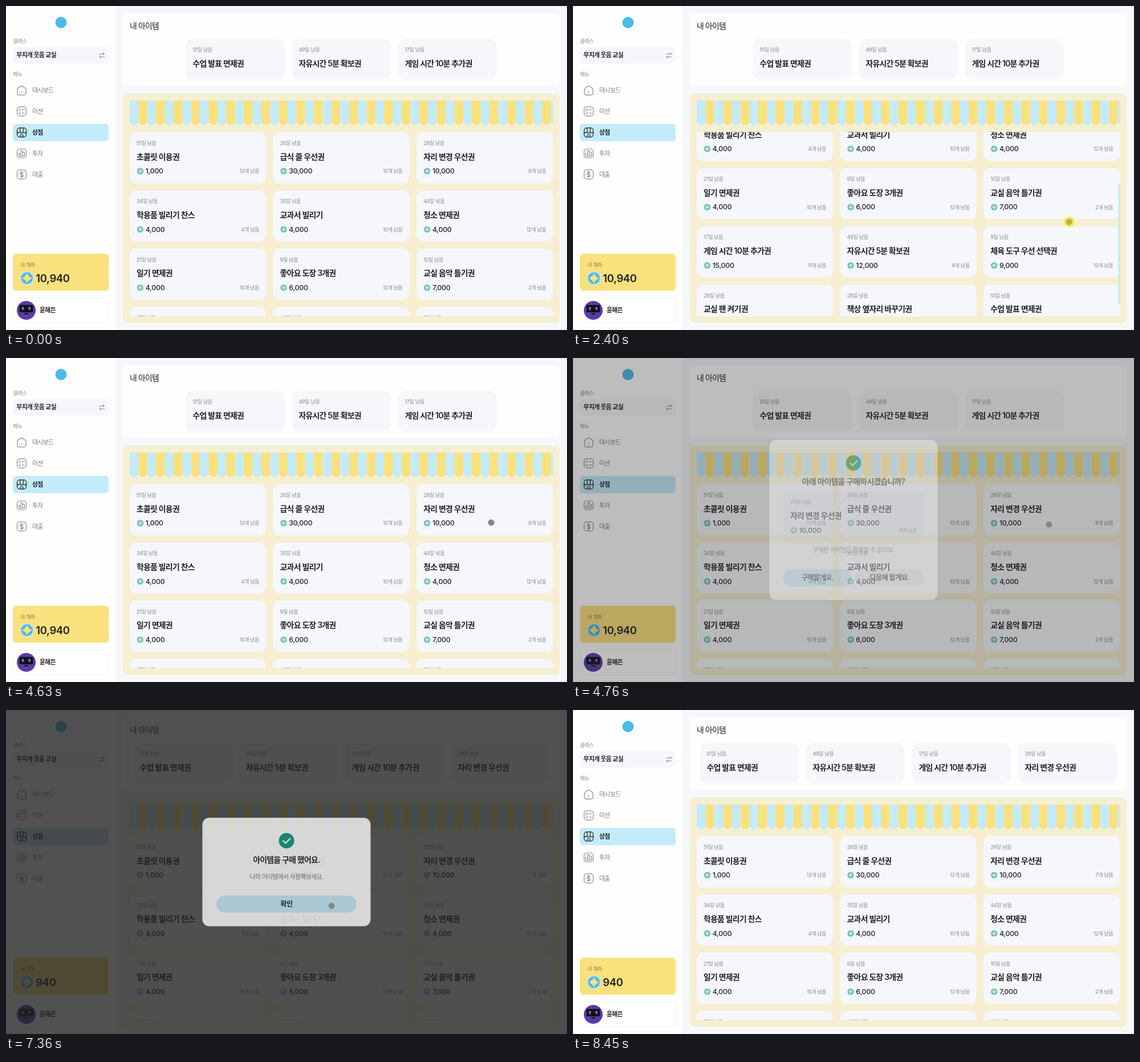
An HTML page for the animation above (8.83 s loop, 984 by 569 pixels).

```html
<!DOCTYPE html>
<html lang="ko">
<head>
<meta charset="utf-8">
<title>상점</title>
<style>
html, body { margin: 0; width: 100%; height: 100%; overflow: hidden; background: #f6f7fb; }
svg { display: block; width: 100%; height: 100%; }
text { font-family: Inter, "Noto Sans CJK KR", "Noto Sans CJK", sans-serif; letter-spacing: -.054em; white-space: pre; }
text.num { letter-spacing: -.02em; }
.icon { fill: none; stroke-width: 1.2; stroke-linecap: round; stroke-linejoin: round; }
</style>
</head>
<body>
<svg id="stage" viewBox="0 0 984 569" xmlns="http://www.w3.org/2000/svg"></svg>
<script>
const LOOP = 8830, BOUGHT_AT = 5910;
const BLUE = '#c3ebfa', YELLOW = '#fae17d', PALE = '#f6f7fb', INK = '#202124', GREY = '#8a8b8e';

const rect = (x, y, w, h, r, fill, extra = '') =>
  `<rect x="${x}" y="${y}" width="${w}" height="${h}" rx="${r}" fill="${fill}" ${extra}/>`;
const circle = (x, y, r, fill) => `<circle cx="${x}" cy="${y}" r="${r}" fill="${fill}"/>`;
const group = (id, body) => `<g id="${id}">${body}</g>`;

// y is the vertical middle of the line
const text = (x, y, str, size, weight = 400, fill = INK, extra = '') =>
  `<text x="${x}" y="${y + size * .37}" font-size="${size}" font-weight="${weight}" fill="${fill}" ${extra}>${str}</text>`;
const small = (x, y, str, extra) => text(x, y, str, 9.24, 400, GREY, extra);
const label = (x, y, str) => text(x, y, str, 9.24, 500, GREY);
const title = (x, y, str, extra) => text(x, y, str, 13.9, 600, INK, extra);
const MIDDLE = 'text-anchor="middle"', END = 'text-anchor="end"', NUM = 'class="num"';

const coin = (x, y, r) => `<g transform="translate(${x} ${y}) scale(${r / 12})">
  ${circle(0, 0, 12, '#b9e5f6')}${circle(0, 0, 10, '#4db8e5')}
  <path d="M0-7.5Q2.5-2.5 7.5 0Q2.5 2.5 0 7.5Q-2.5 2.5-7.5 0Q-2.5-2.5 0-7.5Z" fill="${YELLOW}" stroke="${YELLOW}" stroke-linejoin="round"/></g>`;

// days left | name | price | stock
const goods = `51|초콜릿 이용권|1,000|13
26|급식 줄 우선권|30,000|12
29|자리 변경 우선권|10,000|8
34|학용품 빌리기 찬스|4,000|4
35|교과서 빌리기|4,000|10
44|청소 면제권|4,000|12
21|일기 면제권|4,000|15
9|좋아요 도장 3개권|6,000|12
10|교실 음악 틀기권|7,000|2
17|게임 시간 10분 추가권|15,000|11
49|자유시간 5분 확보권|12,000|9
9|체육 도구 우선 선택권|9,000|13
28|교실 팬 켜기권|5,000|10
28|책상 옆자리 바꾸기권|8,000|7
51|수업 발표 면제권|5,000|12`.split('\n').map(line => line.split('|'));
const chosen = goods[2];
const mine = ['수업 발표', '자유시간', '게임 시간'].map(word => goods.findLast(g => g[1].startsWith(word)));

const card = (x, y, w, [days, name, price, stock], attrs = '') =>
  rect(x, y, w, 89.7, 12, PALE)
  + small(x + 12, y + 19, `${days}일 남음`)
  + title(x + 12, y + 43, name)
  + coin(x + 18.4, y + 68.5, 6.2)
  + text(x + 27.7, y + 68.2, price, 12.3, 500, INK, NUM)
  + small(x + w - 12, y + 68.5, `${stock}개 남음`, `${END} ${attrs}`);

// owned items are centred in the upper panel
const owned = list => list.map(([days, name], i) => {
  const x = 588.2 + (i - list.length / 2) * 186 + 6.2;
  return rect(x, 58, 173.5, 71, 12, PALE) + small(x + 12, 77, `${days}일 남음`) + title(x + 12, 100.5, name);
}).join('');

const frame = '<rect x="-8" y="-8" width="16" height="16" rx="4.5"/>';
const menu = [
  ['대시보드', '<path d="M-7.5-1.5Q-7.5-3-6.3-4L-1.8-7.3Q0-8.5 1.8-7.3L6.3-4Q7.5-3 7.5-1.5V4.5Q7.5 8 4 8H-4Q-7.5 8-7.5 4.5ZM0 2V4.5"/>'],
  ['미션', frame + '<path d="M-5-3l1.2 1.2l2-2.4M1-3h4M-5 3l1.2 1.2l2-2.4M1 3h4"/>'],
  ['상점', frame + '<path d="M-8-1q2.6 4 5.3 0q2.7 4 5.4 0q2.7 4 5.3 0M-2.7-8v7M2.7-8v7M-2.5 8V5.5a2.5 2 0 0 1 5 0V8"/>'],
  ['투자', frame + '<path d="M-5 5V0h3.3V5V-5h3.3V5V-2H5V5Z"/>'],
  ['대출', frame + '<path d="M2.6-2.6Q2-4 0-4Q-2.7-4-2.7-2T0 0T2.7 2T0 4Q-2.2 4-2.8 2.5M0-5.5v11"/>']
];

function sidebar() {
  const rows = menu.map(([name, icon], i) => {
    const y = 148.3 + i * 36.9, on = name === '상점';
    return (on ? rect(12, y - 15.2, 168, 30.5, 6, BLUE) : '')
      + `<g class="icon" stroke="${on ? INK : GREY}" transform="translate(27.5 ${y})">${icon}</g>`
      + text(46, y, name, 10.8, on ? 600 : 500, on ? INK : '#7d7e81');
  }).join('');
  const eye = x => rect(x, 528.5, 3.2, 5, .5, '#6f8fb8');
  return rect(0, 0, 192, 569, 0, '#fefefe')
    + circle(96.5, 29, 10, '#4dbbe8')
    + label(12.3, 62, '클래스')
    + rect(12, 72, 168, 29, 6, PALE)
    + text(18.3, 86.5, '무지개 웃음 교실', 10.8, 600)
    + `<path class="icon" stroke="${GREY}" d="M164 84.5h8.5l-2.2-2M172.5 89H164l2.2 2"/>`
    + label(12.3, 120, '메뉴')
    + rows
    + rect(12, 435, 168, 65, 6, YELLOW)
    + text(24.7, 454.5, '내 계좌', 9.24, 400, '#8b8050')
    + coin(36.8, 478, 12.2)
    + text(52.3, 478, '', 18.5, 600, INK, NUM + ' id="balance"')
    + rect(12.5, 512.5, 167, 44, 6, '#fff', 'stroke="#f0f1f4"')
    + circle(35.5, 534.5, 16.5, '#5a3ba8')
    + rect(23.5, 525, 24, 13, 2.5, '#15131c') + eye(28) + eye(39.5)
    + rect(32, 539.5, 7, 2, .5, '#15131c')
    + text(59, 534.5, '윤해든', 10.8, 600);
}

function awning() {
  const pitch = 15.39;
  const stripes = Array.from({ length: 49 }, (_, i) =>
    `<path d="M${217 + i * pitch} 166h${pitch}v36a${pitch / 2} 7.2 0 0 1-${pitch} 0Z" fill="${i % 2 ? YELLOW : BLUE}"/>`);
  return `<g clip-path="url(#awningClip)">${stripes.join('')}</g>`;
}

// every dialog is centred on the stage
const dialog = (h, heading, body) => {
  const top = 284.5 - h / 2, y = top + 40.3;
  return rect(344.5, top, 295, h, 12, '#fff') + circle(492, y, 13.5, '#0a967c')
    + `<path d="M486 ${y}l4.3 4.3l8-8" class="icon" stroke="#fff" style="stroke-width:2.2"/>`
    + title(492, top + 73.2, heading, MIDDLE) + body;
};
const button = (x, y, w, fill, str) =>
  rect(x, y, w, 29.7, 14.8, fill) + text(x + w / 2, y + 14.3, str, 12.3, 600, INK, MIDDLE);
const note = (y, str) => text(492, y, str, 10.8, 400, '#77787b', MIDDLE);

const confirmBox = dialog(281, '아래 아이템을 구매하시겠습니까?',
  card(369, 234, 246, chosen) + note(337.5, '구매한 아이템은 환불할 수 없어요.')
  + button(369, 371, 120, BLUE, '구매할게요.') + button(495, 371, 120, '#eceeed', '다음에 할게요.'));
const doneBox = dialog(190.5, '아이템을 구매 했어요.',
  note(293, '나의 아이템에서 사용해보세요.') + button(369, 326, 246, BLUE, '확인'));

const shelf = goods.map((g, i) => card(
  217 + (i % 3) * 251.6, 221.5 + Math.floor(i / 3) * 102.3, 239, g, g === chosen ? 'id="stock"' : '')).join('');

document.getElementById('stage').innerHTML = `
  <defs>
    <clipPath id="awningClip">${rect(217, 166, 742.5, 44, 0, '#000')}</clipPath>
    <clipPath id="shelfClip">${rect(217, 221.5, 743, 323.5, 0, '#000')}</clipPath>
  </defs>`
  + rect(0, 0, 984, 569, 0, PALE) + sidebar()
  + rect(204.5, 12.7, 767, 128.3, 9, '#fefefe')
  + text(217, 35, '내 아이템', 13.9, 500)
  + group('before', owned(mine)) + group('after', owned([...mine, chosen]))
  + rect(204.5, 153.7, 767, 403.3, 9, '#f6efd2')
  + awning()
  + `<g clip-path="url(#shelfClip)">${group('shelf', shelf)}</g>`
  + rect(956.3, 221.5, 3.5, 209.5, 1.5, BLUE, 'id="bar"')
  + rect(0, 0, 984, 569, 0, '#202020', 'id="dim"')
  + group('confirm', confirmBox) + group('done', doneBox)
  + group('cursor', '<circle id="halo" r="9.5" fill="#f2ea3c" opacity=".75"/><circle id="dot" r="5.4" stroke="#aaa" stroke-opacity=".6"/>');

const el = Object.fromEntries([...document.querySelectorAll('[id]')].map(n => [n.id, n]));

const clamp = (v, lo, hi) => Math.min(hi, Math.max(lo, v));
const ramp = (t, from, to) => {
  const p = clamp((t - from) / (to - from), 0, 1);
  return p * p * (3 - 2 * p);
};
const pulse = (t, [inFrom, inTo], [outFrom, outTo]) => ramp(t, inFrom, inTo) - ramp(t, outFrom, outTo);

const move = (from, to, x, y, drag = false) => ({ from, to, x, y, drag });
const start = { x: 600, y: 405 };
const moves = [
  move(920, 1200, 580, 364),
  move(1200, 1800, 584, 113, true),
  move(1800, 2270, 868, 345),
  move(2270, 2740, 880, 525, true),
  move(3070, 3360, 876, 262),
  move(3550, 3620, 858, 287),
  move(4600, 4630, 851, 289),
  move(4700, 5240, 397.5, 387.5),
  move(5840, 6160, 562, 289.5),
  move(6400, 6500, 603, 323),
  move(6510, 6830, 571, 344),
  move(7780, 7950, 630, 302),
  move(7950, 8450, 941, 580)
];
const taps = [4360, 5500, 7100], TAP = 135;
const [, pullUp, , pullDown] = moves;

const pointer = t => moves.reduce((p, m) => {
  const k = ramp(t, m.from, m.to);
  return { x: p.x + (m.x - p.x) * k, y: p.y + (m.y - p.y) * k };
}, start);

// the list follows the finger during each drag
function scrollAt(t) {
  const MAX = 175.5;
  const up = clamp(357.5 - pointer(clamp(t, pullUp.from, pullUp.to)).y, 0, MAX);
  const down = pointer(clamp(t, pullDown.from, pullDown.to)).y - 345;
  return clamp(up - down, 0, MAX);
}

function draw(t) {
  const scroll = scrollAt(t);
  el.shelf.setAttribute('transform', `translate(0 ${-scroll})`);
  el.bar.setAttribute('y', 221.5 + scroll * .651);
  el.bar.setAttribute('opacity', pulse(t, [1190, 1230], [3070, 3300]));

  const bought = t >= BOUGHT_AT;
  el.before.style.display = bought ? 'none' : '';
  el.after.style.display = bought ? '' : 'none';
  el.balance.textContent = bought ? '940' : '10,940';
  el.stock.textContent = `${chosen[3] - bought}개 남음`;

  el.dim.setAttribute('opacity', .78 * pulse(t, [4640, 4930], [7370, 7580]));
  el.confirm.setAttribute('opacity', pulse(t, [4640, 4930], [5840, 6040]));
  el.done.setAttribute('opacity', pulse(t, [5900, 6140], [7300, 7500]));

  const { x, y } = pointer(t);
  const down = moves.some(m => m.drag && t >= m.from && t < m.to) || taps.some(at => t >= at && t < at + TAP);
  const visible = t >= 920 && t < 8450 ? 1 - pulse(t, [6290, 6360], [6500, 6510]) : 0;
  el.cursor.setAttribute('transform', `translate(${x} ${y})`);
  el.cursor.setAttribute('opacity', visible);
  el.halo.style.display = down ? '' : 'none';
  el.dot.setAttribute('fill', down ? '#bcb444' : '#858585');
  el.dot.setAttribute('stroke', down ? '#c8c04a' : '#aaa');
}

function tick() {
  draw(performance.now() % LOOP);
  requestAnimationFrame(tick);
}
tick();
</script>
</body>
</html>
```
